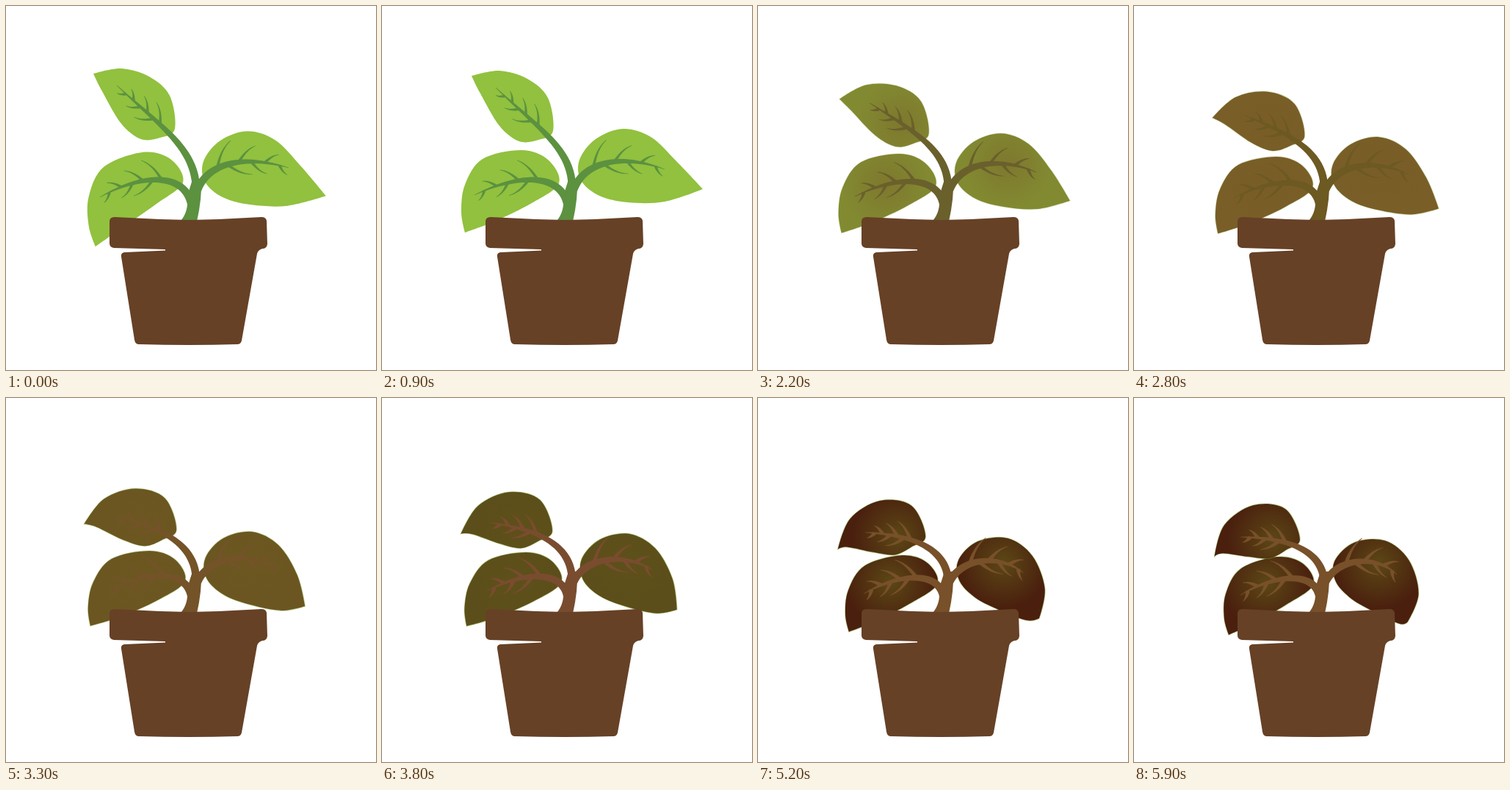
Recreate the animation shown at these times as an HTML page with a canvas. Size 504 by 495 pixels, loop 6000 ms.

```html
<!DOCTYPE html>
<html lang="en">
<head>
<meta charset="utf-8">
<title>Wilting plant</title>
<style>
  html, body { margin: 0; width: 100%; height: 100%; overflow: hidden; background: #fff; }
  canvas { display: block; width: 504px; height: 495px; }
</style>
</head>
<body>
<canvas id="stage" width="504" height="495"></canvas>
<script>
const ctx = document.getElementById('stage').getContext('2d');
const LOOP = 6000, STEP = 100;

const tintTimes = [900, 2200, 2800, 3800, 4600];
const tints = {
  inner: ['#91c13e', '#7e792e', '#795d27', '#5e501a', '#5a4515'],
  outer: ['#91c13e', '#828a31', '#795e28', '#5c4e1a', '#4a1f0e'],
  vein: ['#5c9140', '#6a602c', '#6d5922', '#7a4c2f', '#785029']
};

// edge: fresh outline, tip first. rib: root, two controls and end.
// start, wilt, dead: [sagX, sagY, bend in degrees, shrink, slim, ribEndX, ribEndY]
const leaves = [
  {
    joint: [243, 241], twigs: { from: 0.48, side: 1, length: 39 },
    edge: [113, 308, 108, 280, 113, 243, 137, 208, 190, 196, 226, 209, 241, 241, 204, 268, 153, 293],
    rib: [252, 268, 243, 230, 190, 226, 126, 257],
    start: [0, -1, -8.4, -0.02, 0, 2, 3],
    wilt: [3, 10, 2.9, 0.02, 0.1, 17, 6],
    dead: [3, 13, -2.9, 0.075, 0.1, 19, 11]
  },
  {
    joint: [233, 173], twigs: { from: 0.64, side: 1, length: 31 },
    edge: [122, 95, 160, 88, 198, 99, 226, 125, 233, 170, 213, 182, 187, 184, 160, 163, 134, 119],
    rib: [259, 250, 260, 195, 215, 168, 155, 111],
    start: [-3, -3, 0, 0, 0, -4, -3],
    wilt: [-1, 11, -37, 0.086, 0, -8, 61],
    dead: [-7, 22, -45, 0.13, 0, -10, 78]
  },
  {
    joint: [268, 225], twigs: { from: 0.35, side: -1, length: 42 },
    edge: [437, 249, 401, 211, 366, 178, 328, 167, 291, 181, 269, 209, 271, 237, 296, 258, 335, 267, 385, 266],
    rib: [261, 250, 275, 212, 325, 200, 385, 222],
    start: [0, 2, 2.5, 0, 0, 0, -2],
    wilt: [3, 10, 14.6, 0.18, 0, -17, 12],
    dead: [4, 12, 25.6, 0.29, 0, -27, 18]
  }
];

const trunk = new Path2D('M237 293Q249 281 247 258L254 236H266Q267 262 260 293Z');
const pot = new Path2D(
  'M141 293Q141 287 148 287Q200 290 250 291Q300 290 348 287Q354 287 355 292L356 324' +
  'Q355 330 349 330Q343 332 342 337L321 455Q320 460 315 460Q250 462 181 460Q176 460 175 454' +
  'L157 341Q156 336 161 335L217 332.4V331L147 329Q141 328 141 323Z');

const mix = (a, b, p) => a + (b - a) * p;
const clamp = p => Math.min(1, Math.max(0, p));
const rgb = hex => [1, 3, 5].map(i => parseInt(hex.slice(i, i + 2), 16));

function ease(t, from, to) {
  const p = clamp((t - from) / (to - from));
  return p * p * (3 - 2 * p);
}

function tint(colors, t) {
  let i = 0;
  while (i < tintTimes.length - 2 && t >= tintTimes[i + 1]) i++;
  const p = clamp((t - tintTimes[i]) / (tintTimes[i + 1] - tintTimes[i]));
  const end = rgb(colors[i + 1]);
  return `rgb(${rgb(colors[i]).map((v, k) => Math.round(mix(v, end[k], p)))})`;
}

// Bend points around the joint, more strongly the farther out they lie
function bendEdge({ joint: [jx, jy], edge }, [sagX, sagY, bend, shrink, slim]) {
  const ax = edge[0] - jx, ay = edge[1] - jy, size = Math.hypot(ax, ay);
  const nx = -ay / size, ny = ax / size;
  const points = [];
  for (let i = 0; i < edge.length; i += 2) {
    let x = edge[i] - jx, y = edge[i + 1] - jy;
    const far = Math.hypot(x, y) / size, off = (x * nx + y * ny) * slim;
    x -= nx * off;
    y -= ny * off;
    const turn = bend * far * Math.PI / 180, scale = 1 - shrink * far ** 4;
    const c = Math.cos(turn) * scale, s = Math.sin(turn) * scale;
    points.push([jx + sagX + x * c - y * s, jy + sagY + x * s + y * c]);
  }
  return points;
}

// Smooth closed outline with a sharp corner at its first point
function outline(points) {
  const n = points.length, at = i => points[(i + n) % n];
  const slope = i => i % n === 0 ? [0, 0] : [0, 1].map(k => (at(i + 1)[k] - at(i - 1)[k]) / 6);
  const path = new Path2D();
  path.moveTo(...at(0));
  for (let i = 0; i < n; i++) {
    const [x0, y0] = at(i), [x1, y1] = at(i + 1), a = slope(i), b = slope(i + 1);
    path.bezierCurveTo(x0 + a[0], y0 + a[1], x1 - b[0], y1 - b[1], x1, y1);
  }
  path.closePath();
  return path;
}

function cubic(c, t) {
  const u = 1 - t;
  const pos = k => u ** 3 * c[k] + 3 * u * u * t * c[k + 2] + 3 * u * t * t * c[k + 4] + t ** 3 * c[k + 6];
  const vel = k => u * u * (c[k + 2] - c[k]) + 2 * u * t * (c[k + 4] - c[k + 2]) + t * t * (c[k + 6] - c[k + 4]);
  return { x: pos(0), y: pos(1), dir: Math.atan2(vel(1), vel(0)) };
}

// Fill a curve whose width narrows towards its end
function taper(c, width, power) {
  const left = [], right = [];
  for (let i = 0; i <= 24; i++) {
    const t = i / 24, { x, y, dir } = cubic(c, t);
    const r = (width * (1 - t ** power) + 0.6) / 2;
    const dx = -Math.sin(dir) * r, dy = Math.cos(dir) * r;
    left.push([x + dx, y + dy]);
    right.unshift([x - dx, y - dy]);
  }
  ctx.beginPath();
  left.concat(right).forEach(p => ctx.lineTo(...p));
  ctx.fill();
}

// Twigs alternate sides and get shorter towards the tip
function drawTwigs(rib, { from, side, length }, width) {
  for (let k = 0; k < 6; k++) {
    const { x, y, dir } = cubic(rib, mix(from, 0.93, k / 5));
    const len = length * (1 - 0.12 * k), sign = k % 2 ? -side : side;
    const reach = (part, turn) => {
      const a = dir + sign * turn;
      return [x + Math.cos(a) * len * part, y + Math.sin(a) * len * part];
    };
    taper([x, y, ...reach(0.3, 0.9), ...reach(0.65, 0.88), ...reach(1, 0.65)], width, 1.2);
  }
}

function drawLeaf(leaf, t, style) {
  const a = 1 - ease(t, 0, 900), b = style.wilt, c = ease(t, 4200, 5900);
  const pose = leaf.wilt.map((v, i) => leaf.start[i] * a + v * (b - c) + leaf.dead[i] * c);
  const [sagX, sagY, , , , endX, endY] = pose;
  const shift = [0, 0, sagX / 2, sagY / 2, sagX, sagY, endX, endY];
  const rib = leaf.rib.map((v, i) => v + shift[i]);
  const shape = outline(bendEdge(leaf, pose));

  const { x, y } = cubic(rib, 0.75);
  const fill = ctx.createRadialGradient(x, y, 4, x, y, 62);
  fill.addColorStop(0, style.inner);
  fill.addColorStop(1, style.outer);
  ctx.strokeStyle = `rgba(125,165,45,${0.6 * b})`;
  ctx.lineWidth = 1.4;
  ctx.stroke(shape);
  ctx.fillStyle = fill;
  ctx.fill(shape);

  ctx.fillStyle = style.vein;
  taper(rib, 10, 1.9);
  drawTwigs(rib, leaf.twigs, mix(3.4, 5, b));
}

function draw(t) {
  const style = { wilt: ease(t, 900, 4200) };
  for (const key in tints) style[key] = tint(tints[key], t);
  ctx.fillStyle = '#fff';
  ctx.fillRect(0, 0, 504, 495);
  leaves.forEach(leaf => drawLeaf(leaf, t, style));
  ctx.fillStyle = style.vein;
  ctx.fill(trunk);
  ctx.fillStyle = '#664126';
  ctx.fill(pot);
}

const start = performance.now();
function tick() {
  const t = (performance.now() - start) % LOOP;
  draw(Math.floor(t / STEP) * STEP);
  requestAnimationFrame(tick);
}
tick();
</script>
</body>
</html>
```
